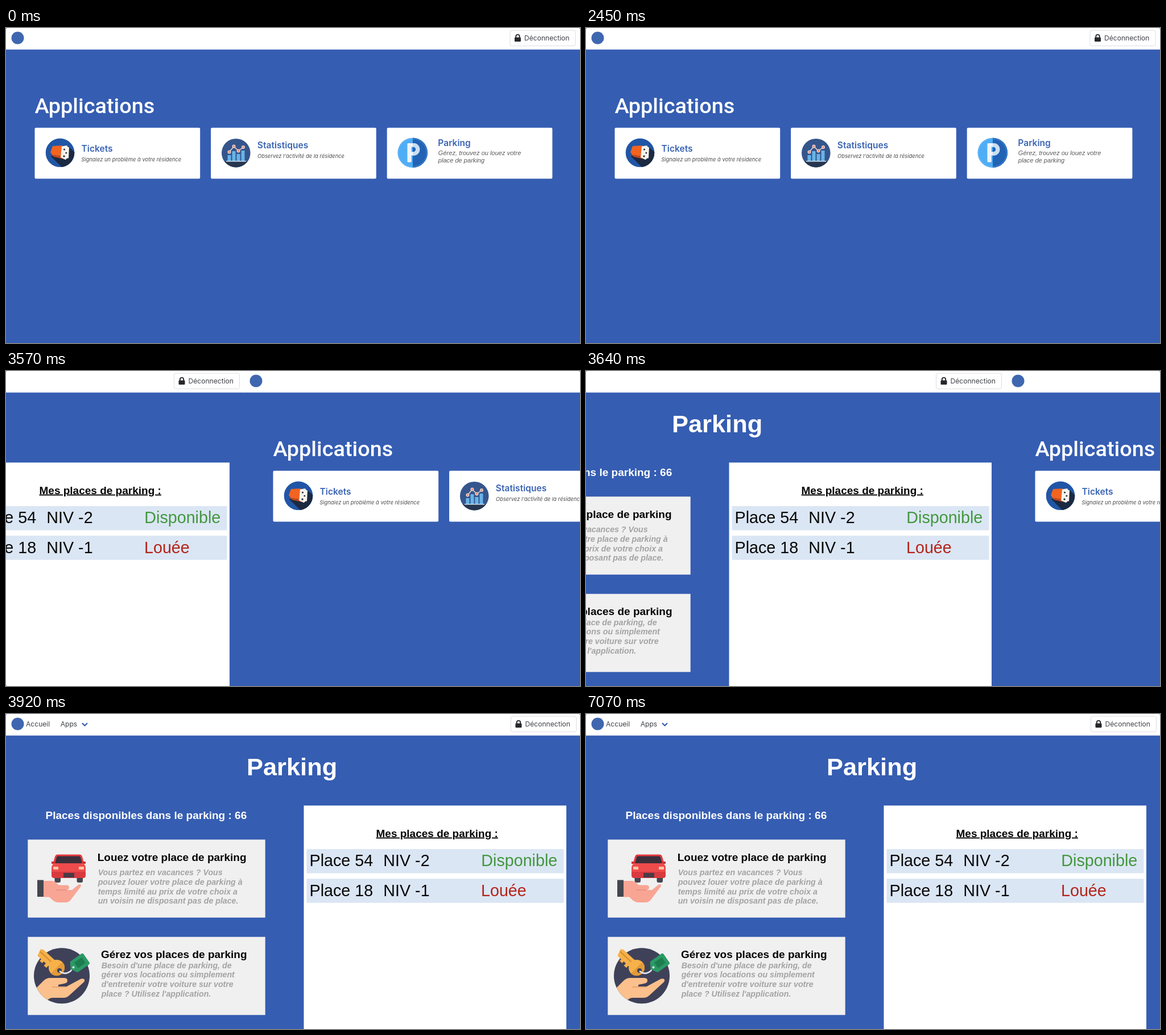
An HTML page for the animation above (7140 ms loop, 1009 by 555 pixels).

```html
<!DOCTYPE html>
<html lang="fr">
<head>
<meta charset="utf-8">
<title>Applications</title>
<style>
  html, body { margin: 0; width: 100%; height: 100%; overflow: hidden; background: #5d6473; }
  svg { display: block; width: 1009px; height: 555px; border-radius: 2px; background: #355db2; }
  text { white-space: pre; }
  .nav { font: 400 12.1px Inter, sans-serif; fill: #404248; }
  .heading { font: 500 37.8px Roboto, sans-serif; fill: #fff; }
  .app { font: 600 15.6px Inter, sans-serif; fill: #3a64b4; }
  .note { font: italic 400 9.4px Inter, sans-serif; fill: #4c4c4c; }
  .wide { font: italic 400 11.1px "Liberation Sans", Arial, sans-serif; fill: #5a5a5a; }
  .bold { font: 700 19px "Liberation Sans", Arial, sans-serif; fill: #050505; }
  .big { font-size: 43.4px; }
  .white { fill: #fff; }
  .under { text-decoration: underline; }
  .text { font: italic 700 14.2px "Liberation Sans", Arial, sans-serif; fill: #a3a3a3; }
  .row { font: 400 28.7px "Liberation Sans", Arial, sans-serif; fill: #080808; }
  .row .free { fill: #43973f; }
  .row .taken { fill: #b5241b; }
  .tile { fill: #f0f0f0; }
</style>
</head>
<body>
<svg viewBox="0 0 1009 555">
  <defs>
    <g id="bar">
      <rect x="-2" width="1013" height="38" fill="#fff"/>
      <path d="M-2 37.7H1011" stroke="#cfd9ec" stroke-width=".7"/>
      <circle cx="20.5" cy="17.5" r="11" fill="#3f67b0"/>
    </g>
    <g id="logout">
      <rect x=".5" y="4" width="115" height="27.5" rx="3" fill="#fff" stroke="#dcdee2"/>
      <rect x="8.5" y="16.5" width="11" height="7.5" rx="1.2" fill="#26272b"/>
      <path d="M10.8 17v-2.2a3.2 3.2 0 0 1 6.4 0V17" fill="none" stroke="#26272b" stroke-width="1.9"/>
      <text class="nav" x="25.5" y="22.3">Déconnection</text>
    </g>
    <clipPath id="ticketDisc"><circle cx="95" cy="219.8" r="25.3"/></clipPath>
    <clipPath id="chartDisc"><circle cx="404.3" cy="220.2" r="25.3"/></clipPath>
    <clipPath id="rightHalf"><path d="M715 190h30v60h-30z"/></clipPath>
    <clipPath id="keyDisc"><circle cx="98" cy="461.3" r="49"/></clipPath>
    <path id="letterP" fill-rule="evenodd" d="M705.5 204.5q0-1.5 1.5-1.5h9.500a10.800 10.800 0 0 1 0 21.600h-3.800v10.400q0 1.5-1.5 1.5h-4.200q-1.5 0-1.5-1.5zM712.700 209.500v8.700h3.300a4.350 4.350 0 0 0 0-8.700z"/>
  </defs>

  <g id="home">
    <use href="#bar"/>
    <use href="#logout" x="885.5"/>
    <text class="heading" x="50.5" y="150">Applications</text>
    <g fill="#fff">
      <rect x="50.5" y="175.8" width="290.700" height="89.800" rx="2"/>
      <rect x="360.100" y="175.8" width="290.700" height="89.800" rx="2"/>
      <rect x="669.700" y="175.8" width="290.700" height="89.800" rx="2"/>
    </g>

    <g clip-path="url(#ticketDisc)">
      <path d="M69 194h52v52H69z" fill="#2156a6"/>
      <path d="M110 209l30 28-25 25-36-36z" fill="#1b2a42"/>
    </g>
    <path d="M82 208l17-1-3 19-15-2.500q-1-3-3-4.500z" fill="#f2641f"/>
    <path d="M80 223.500l16 2.500 4-4 2 9-18-4z" fill="#c8481a"/>
    <path d="M98 208.500l9-1.5q1 3 4 3.200l-1 19q-4 0-5 3l-9-4.200z" fill="#f7f3ed"/>
    <g fill="#2a3242">
      <circle cx="102.5" cy="214" r="1.6"/><circle cx="105.8" cy="220" r="1.5"/><circle cx="102" cy="226" r="1.7"/>
    </g>
    <text class="app" x="132.5" y="218.3">Tickets</text>
    <text class="note" x="132.3" y="235">Signalez un problème à votre résidence</text>

    <g clip-path="url(#chartDisc)">
      <path d="M378 194h53v53h-53z" fill="#35568d"/>
      <path d="M378 235h53v12h-53z" fill="#27364f"/>
    </g>
    <path d="M389.500 224h6v10h-6zM397.500 217h6v17h-6zM405.500 222h6v12h-6zM413.500 216h6v18h-6z" fill="#68b4e8"/>
    <path d="M387 234.800h35" stroke="#cfe5f4" stroke-width="1.6"/>
    <g fill="#e9745c" stroke="#f3d7cb" stroke-width="1.5">
      <path d="M392.500 218.500l8-10 8 8 8.500-6.500" fill="none"/>
      <circle cx="392.5" cy="218.5" r="2.2"/><circle cx="400.5" cy="208.5" r="2.2"/>
      <circle cx="408.5" cy="216.5" r="2.2"/><circle cx="417" cy="210" r="2.2"/>
    </g>
    <text class="app" x="441.8" y="212">Statistiques</text>
    <text class="note" x="442" y="228.6">Observez l'activité de la résidence</text>

    <circle cx="714.8" cy="219.7" r="26.3" fill="#4fadf6"/>
    <circle cx="714.8" cy="219.7" r="26.3" fill="#2363b5" clip-path="url(#rightHalf)"/>
    <circle cx="714.8" cy="219.7" r="24.7" fill="none" stroke="#79c0f6" stroke-width=".8" stroke-opacity=".6"/>
    <use href="#letterP" fill="#eef5fb"/>
    <use href="#letterP" fill="#c9dff2" clip-path="url(#rightHalf)"/>
    <text class="app" x="759.3" y="207.5">Parking</text>
    <text class="wide" x="759.8" y="224">Gérez, trouvez ou louez votre</text>
    <text class="wide" x="759.8" y="237">place de parking</text>
  </g>

  <g id="parking">
    <use href="#bar"/>
    <use href="#logout" x="887"/>
    <text class="nav" x="35" y="22.3">Accueil</text>
    <text class="nav" x="95.7" y="22.3">Apps</text>
    <path d="M134 16l4.500 4.500 4.500-4.500" fill="none" stroke="#355db2" stroke-width="2.2"/>
    <text class="bold big white" x="423" y="107.6">Parking</text>
    <text class="bold white" x="69.5" y="184.8">Places disponibles dans le parking : 66</text>

    <rect class="tile" x="38.3" y="221.3" width="417.400" height="137.400"/>
    <g id="car">
      <path d="M85.500 284h10.500v10q0 3-3 3h-4.500q-3 0-3-3zM124.500 284h10.500v10q0 3-3 3h-4.500q-3 0-3-3z" fill="#454650"/>
      <path d="M91 247.500h38q4 0 5 4l3.500 12H82.500l3.500-12q1-4 5-4z" fill="#e6393f"/>
      <path d="M91.500 250.500h37q2 0 2.500 2l3 11H86l3-11q.5-2 2.500-2z" fill="#3b2f3a"/>
      <path d="M80 260h5v4h-5zM135 260h5v4h-5z" fill="#c92f38"/>
      <path d="M86 263h48q6 2 6 8v13q0 5-5 5H85q-5 0-5-5v-13q0-6 6-8z" fill="#ee4b4c"/>
      <path d="M80 278h60v6q0 5-5 5H85q-5 0-5-5z" fill="#d93a40"/>
      <path d="M101 280h19v8h-19z" fill="#4a3b45"/>
      <path d="M83 269h9v5H83zM128 269h9v5h-9z" fill="#f9c6a2"/>
    </g>
    <g id="palm">
      <path d="M55 292.500h11v29.500H55z" fill="#45464f"/>
      <path d="M66 294h14q5 0 9 4l4 3.500h13q5 0 5 4t-5 4.500h10l11-9q4-2.500 5 1 0 2-2 4l-15 20q-4 6-11 6H92q-5 0-10-4l-6-5.500H66z" fill="#f8a594"/>
      <path d="M88 310h18" fill="none" stroke="#e78a7d" stroke-width="1.5" stroke-linecap="round"/>
    </g>
    <text class="bold" x="160.7" y="258.8">Louez votre place de parking</text>
    <g class="text">
      <text x="161.7" y="284">Vous partez en vacances ? Vous</text>
      <text x="161.7" y="300.8">pouvez louer votre place de parking à</text>
      <text x="161.7" y="317.6">temps limité au prix de votre choix a</text>
      <text x="161.7" y="334.4">un voisin ne disposant pas de place.</text>
    </g>

    <rect class="tile" x="38.3" y="392.7" width="417.400" height="137.600"/>
    <circle cx="98" cy="461.3" r="49" fill="#3f4159"/>
    <g clip-path="url(#keyDisc)">
      <path d="M49 487l17-17q5-5 12-5h24q6 0 6 4.500t-6 5.500l-10 2v4h13l26-14q5-2 7 1 1 3-3 6l-24 22q-4 4-10 4H82q-5 0-9 4l-8 9z" fill="#fbc08b"/>
      <path d="M82 481h23" stroke="#e8a571" stroke-width="2" stroke-linecap="round"/>
    </g>
    <g transform="translate(89 447) rotate(43)">
      <path d="M-43-4.500l4-3h34v15h-8v5h-6v-5h-5v4h-6v-4h-9z" fill="#f6b14b"/>
      <path d="M-41-1h36" stroke="#d9912f" stroke-width="2.5"/>
    </g>
    <circle cx="89" cy="447" r="14" fill="#f6b14b"/>
    <path d="M99 437a14 14 0 0 1-20 20z" fill="#e39a38"/>
    <circle cx="94" cy="452" r="4" fill="#3f4159"/>
    <path d="M94 453q10 8 20-.5l4-7" fill="none" stroke="#e4e7ea" stroke-width="2.5"/>
    <g transform="translate(127.500 440) rotate(-35)">
      <path d="M-17 0l7-11.500h24q3 0 3 3v17q0 3-3 3h-24z" fill="#2b9a65"/>
      <path d="M-5-6H11V6H-5z" fill="#1d7d4f"/>
      <circle cx="-11" r="2" fill="#e4e7ea"/>
    </g>
    <text class="bold" x="166.9" y="430.3">Gérez vos places de parking</text>
    <g class="text">
      <text x="167.7" y="447.5">Besoin d'une place de parking, de</text>
      <text x="167.7" y="464.3">gérer vos locations ou simplement</text>
      <text x="167.7" y="481.1">d'entretenir votre voiture sur votre</text>
      <text x="167.7" y="497.9">place ? Utilisez l'application.</text>
    </g>

    <rect x="523.5" y="161.3" width="461.5" height="394" fill="#fff"/>
    <text class="bold under" x="650.5" y="216.5">Mes places de parking :</text>
    <path d="M528.500 238h452v42.500h-452zM528.500 290.300h452v42.500h-452z" fill="#dbe6f4"/>
    <g class="row">
      <text x="533.5" y="268.3">Place 54</text>
      <text x="663.3" y="268.3">NIV -2</text>
      <text class="free" x="835.3" y="268.3">Disponible</text>
      <text x="533.5" y="321">Place 18</text>
      <text x="663.3" y="321">NIV -1</text>
      <text class="taken" x="835" y="321">Louée</text>
    </g>
  </g>
</svg>
<script>
  const LOOP = 7140, STEP = 70;
  const SLIDE = { start: 3218, length: 738, distance: 1011 };
  const home = document.getElementById('home');
  const parking = document.getElementById('parking');

  const easeInOut = u => u < .5 ? 8 * u ** 4 : 1 - 8 * (1 - u) ** 4;
  const place = (page, x) => page.setAttribute('transform', `translate(${Math.round(x)} 0)`);

  function draw(time) {
    const t = Math.floor(time % LOOP / STEP) * STEP;
    const u = Math.min(1, Math.max(0, (t - SLIDE.start) / SLIDE.length));
    const x = SLIDE.distance * easeInOut(u);
    place(home, x);
    place(parking, x - SLIDE.distance);
  }

  let begin;
  function tick(now) {
    begin ??= now;
    draw(now - begin);
    requestAnimationFrame(tick);
  }
  draw(0);
  requestAnimationFrame(tick);
</script>
</body>
</html>
```
